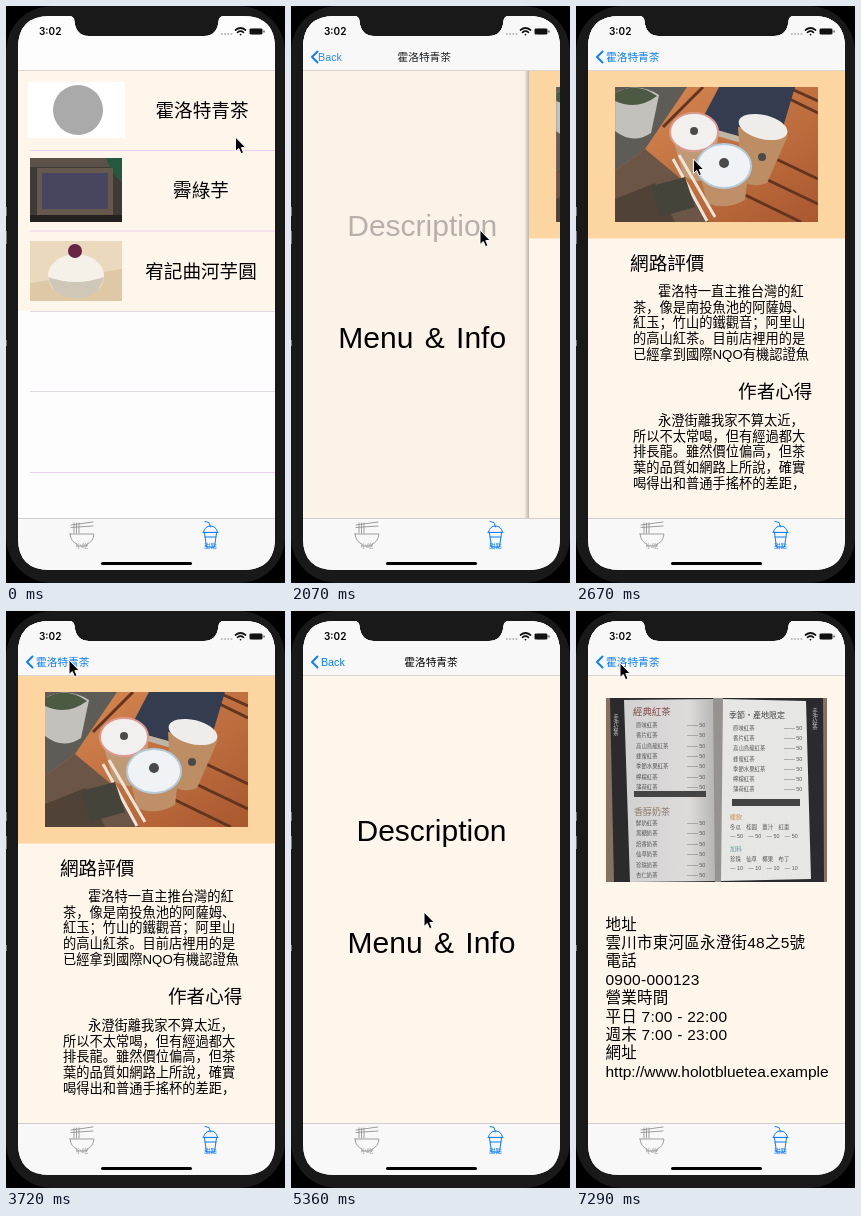
Recreate the animation shown at these times as an HTML page. Size 279x577 px, loop 8000 ms.

```html
<!DOCTYPE html>
<html lang="zh-Hans">
<head>
<meta charset="utf-8">
<style>
html, body { margin: 0; height: 100%; overflow: hidden; background: #000 }
svg { display: block }
text { font-family: 'Liberation Sans', 'Noto Sans CJK SC', 'Noto Sans CJK', sans-serif; white-space: pre }
.mid { text-anchor: middle }
.row, .head { font-size: 18.6px }
.big { font-size: 30px; word-spacing: 3px; text-anchor: middle }
.body { font-size: 13.25px }
.info { font-size: 15.5px }
.loose { letter-spacing: .25px }
.nav { font-size: 10.7px }
.blue { fill: #0a7cff }
.tiny { font-size: 5.4px; fill: #555 }
.side { font-size: 5.4px; fill: #ccc; writing-mode: vertical-rl }
.line { fill: none; stroke-linecap: round; stroke-linejoin: round }
</style>
</head>
<body>
<svg width="279" height="577" viewBox="0 0 279 577">
<defs>
  <clipPath id="screen"><path d="M44 10H63Q68 10 68.500 15Q70 30 83 30H198Q211 30 212.500 15Q213 10 218 10H237Q269 10 269 42V532Q269 564 237 564H44Q12 564 12 532V42Q12 10 44 10Z"/></clipPath>
  <linearGradient id="edge"><stop stop-opacity="0"/><stop offset="1" stop-opacity=".3"/></linearGradient>
  <linearGradient id="paper"><stop stop-color="#d2d1d1"/><stop offset=".7" stop-color="#dddcdb"/><stop offset="1" stop-color="#b3b1b0"/></linearGradient>
  <linearGradient id="wood" x2="1" y2="1"><stop stop-color="#d98a52"/><stop offset="1" stop-color="#a9582f"/></linearGradient>
</defs>
<rect width="279" height="577" rx="46" fill="#19191a"/>
<path d="M0 201v9M0 225v13M0 334v6" stroke="#777" stroke-width="2"/>

<g clip-path="url(#screen)">
  <rect x="12" y="10" width="257" height="554" fill="#fdfdfd"/>

  <g id="list">
    <rect x="12" y="65" width="257" height="448" fill="#fdfdfd"/>
    <rect x="12" y="65" width="257" height="240" fill="#fff6eb"/>
    <rect id="selected" x="12" y="65" width="257" height="80" fill="#d4d4d6"/>
    <path d="M24 144.500h245M24 225h245M24 466.500h245" stroke="#f0cdf3"/>
    <path d="M24 305.500h245M24 385.500h245" stroke="#e2dae3"/>
    <rect x="22" y="76" width="97" height="56" fill="#fff"/>
    <circle cx="72" cy="104" r="25" fill="#aaa"/>
    <svg x="24" y="152" width="92" height="64">
      <path d="M0 0H92V64H0Z" fill="#403a36"/>
      <path d="M0 0H92V9H0Z" fill="#5b5148"/>
      <path d="M76 0H92V24Q82 18 76 0Z" fill="#24583f"/>
      <path d="M7 10H83V57H7Z" fill="#65594e"/>
      <path d="M12 15H78V51H12Z" fill="#484560"/>
      <path d="M0 57H92V64H0Z" fill="#242020"/>
    </svg>
    <svg x="24" y="235" width="92" height="60">
      <path d="M0 0H92V60H0Z" fill="#ead9bd"/>
      <path d="M0 42L92 28V60H0Z" fill="#dfc8a5"/>
      <ellipse cx="46" cy="35" rx="28" ry="22" fill="#f5f1e8"/>
      <path d="M18 36Q46 46 74 36Q69 57 46 57T18 36Z" fill="#cfc7b7"/>
      <circle cx="45" cy="10" r="7" fill="#692344"/>
    </svg>
    <g class="mid">
      <text class="row" x="196" y="110.500">霍洛特青茶</text>
      <text class="row" x="195" y="191">霽綠芋</text>
      <text class="row" x="195" y="271.500">宥記曲河芋圓</text>
    </g>
    <rect id="listShade" x="12" y="65" width="257" height="448"/>
  </g>

  <g id="menu">
    <rect class="edge" x="7" y="65" width="5" height="448" fill="url(#edge)"/>
    <rect x="12" y="65" width="257" height="448" fill="#fff6eb"/>
    <text class="big" id="descBtn" x="140.500" y="230">Description</text>
    <text class="big" id="infoBtn" x="140.500" y="341.500">Menu &amp; Info</text>
    <rect id="menuShade" x="12" y="65" width="257" height="448"/>
  </g>

  <g id="detail">
    <rect class="edge" x="7" y="65" width="5" height="448" fill="url(#edge)"/>
    <rect x="12" y="65" width="257" height="448" fill="#fff6eb"/>
    <rect x="12" y="65" width="257" height="167.500" fill="#fdd5a0"/>
    <svg x="39" y="81" width="203" height="135">
      <path d="M0 0H203V135H0Z" fill="url(#wood)"/>
      <path d="M150 0L203 26M172 0L203 14M140 62L203 92M134 84L203 117M126 106L186 135M48 40L88 0" stroke="#63351f" stroke-width="3"/>
      <path d="M0 0H72L30 62L0 84Z" fill="#5d5c57"/>
      <path d="M0 6Q22 -6 44 8L36 46Q18 58 0 44Z" fill="#c3c1bb"/>
      <path d="M0 6Q22 -6 42 9Q22 24 0 14Z" fill="#4d5a43"/>
      <path d="M0 84L30 62L66 92L94 135H0Z" fill="#6b5546"/>
      <path d="M0 112L40 96L60 135H0Z" fill="#514238"/>
      <path d="M104 0H180L162 60L84 38Z" fill="#343c50"/>
      <path d="M84 38L162 60L160 66L82 43Z" fill="#bdb5a6"/>
      <path d="M58 52L68 88Q84 100 100 88L103 50Z" fill="#c09a74"/>
      <ellipse cx="79" cy="45" rx="24" ry="19" fill="#f1f0ef" stroke="#dc9a8e" stroke-width="2"/>
      <path d="M123 40L126 92Q136 102 152 96L173 48Z" fill="#bd8e63"/>
      <ellipse cx="148" cy="40" rx="25" ry="12" fill="#efedea" transform="rotate(14 148 40)"/>
      <path d="M84 84L92 116Q110 124 130 113L134 80Z" fill="#bf9067"/>
      <ellipse cx="109" cy="79" rx="27" ry="22" fill="#eff3f6" stroke="#b4cbdc" stroke-width="2"/>
      <path d="M58 72L92 134M64 68L100 130" stroke="#eee4d8" stroke-width="3"/>
      <path d="M36 99L70 90L80 120L45 130Z" fill="#45443a"/>
      <g fill="#4b4a4b"><circle cx="79" cy="44" r="4"/><circle cx="109" cy="76" r="5"/><circle cx="147" cy="70" r="4"/></g>
    </svg>
    <text class="head" x="54" y="264">網路評價</text>
    <text class="head" x="162" y="392">作者心得</text>
    <g id="reviews"></g>
  </g>

  <g id="info">
    <rect class="edge" x="7" y="65" width="5" height="448" fill="url(#edge)"/>
    <rect x="12" y="65" width="257" height="448" fill="#fff6eb"/>
    <svg x="30" y="87" width="221" height="184">
      <path d="M0 0H221V184H0Z" fill="#2b2a2c"/>
      <path d="M0 0H4L8 184H0ZM217 0H221V184H218Z" fill="#86705f"/>
      <path d="M18 2L108 1L111 183L24 184Z" fill="url(#paper)"/>
      <path d="M116 1L200 3L205 181L114 183Z" fill="#e6e6e5"/>
      <path d="M107 0H117L115 184H109Z" fill="#96928f"/>
      <g id="drinks"></g>
      <path d="M28 93H100V99H28ZM126 101H194V108H126Z" fill="#444"/>
    </svg>
    <g id="facts"></g>
  </g>

  <rect x="12" y="10" width="257" height="54" fill="#fdfdfd"/>
  <rect id="bar" x="12" y="10" width="257" height="54" fill="#f8f8f8"/>
  <path d="M12 64.500h257" stroke="#d9d6d3"/>
  <path id="chevron" class="line" d="M26.500 45.500L21 51L26.500 56.500" stroke="#0a7cff" stroke-width="1.900"/>
  <text id="title" class="nav mid" y="55" font-weight="500">霍洛特青茶</text>
  <text id="back" class="nav blue" y="55">Back</text>
  <text id="crumb" class="nav blue" y="55">霍洛特青茶</text>

  <text x="33" y="29" style="font:600 10px Inter,sans-serif">3:02</text>
  <path d="M215 28h12" stroke="#aaa" stroke-width="1.700" stroke-dasharray="1.700 1.500"/>
  <path class="line" d="M229.500 24Q234.500 20 239.500 24M231.500 26.300Q234.500 24 237.500 26.300M234.500 28.500v.1" stroke="#111" stroke-width="1.700"/>
  <rect x="243.500" y="22.500" width="13" height="6" rx="1.800" fill="none" stroke="#777"/>
  <path d="M244 23h12v5h-12zM257.500 24.500h1v2h-1z" fill="#111"/>

  <rect x="12" y="513" width="257" height="51" fill="#f8f8f8"/>
  <path d="M12 512.500h257" stroke="#cfcccb"/>
  <path class="line" d="M65 519L87 516M65 521.500L87 520M68 517V527M70.500 517V527M73 517V527M64 528H88Q87 536 81 538V540H71V538Q65 536 64 528Z" stroke="#929292" stroke-width=".9"/>
  <path class="line" d="M199 515.500L203 516.500L204.500 521M197.500 526Q199 520 204.500 520T211.500 526ZM197 526.500H212M198.500 527L200.500 541H208.500L210.500 527M199 531H210" stroke="#0a7cff"/>
  <text class="mid" x="76" y="541.500" font-size="6.200" fill="#929292">小吃</text>
  <text class="mid blue" x="204.500" y="541.500" font-size="6.200" font-weight="500">甜點</text>
  <rect x="95" y="556" width="91" height="3" rx="1.500"/>
</g>
<path id="cursor" d="M0 0V14.500L3.300 11.500L5.600 16.700L8 15.600L5.800 10.600H10.300Z" stroke="#fff" stroke-width="1"/>
</svg>

<script>
const $ = id => document.getElementById(id);
const line = (cls, x, y, str, extra = '') => `<text class="${cls}" x="${x}" y="${y}" ${extra}>${str}</text>`;
const column = (cls, x, y, pitch, rows) =>
  rows.map((str, i) => line(cls, x, y + i * pitch, str)).join('');

const review = (y, rows) => line('body', 82, y, rows[0]) + column('body', 57, y + 15.7, 15.7, rows.slice(1));
$('reviews').innerHTML =
  review(290, ['霍洛特一直主推台灣的紅', '茶，像是南投魚池的阿薩姆、', '紅玉；竹山的鐵觀音；阿里山',
    '的高山紅茶。目前店裡用的是', '已經拿到國際NQO有機認證魚']) +
  review(419, ['永澄街離我家不算太近，', '所以不太常喝，但有經過都大', '排長龍。雖然價位偏高，但茶',
    '葉的品質如網路上所說，確實', '喝得出和普通手搖杯的差距，']);

$('facts').innerHTML =
  column('info loose', 29.5, 318.5, 18.4, ['地址', '雲川市東河區永澄街48之5號', '電話', '0900-000123',
    '營業時間', '平日 7:00 - 22:00', '週末 7:00 - 23:00', '網址']) +
  line('info', 29.5, 466, 'http://www.holotbluetea.example');

const teas = ['原味紅茶', '香片紅茶', '高山烏龍紅茶', '蜂蜜紅茶', '季節水果紅茶', '檸檬紅茶', '薄荷紅茶'];
const milks = ['鮮奶紅茶', '黑糖奶茶', '焙香奶茶', '仙草奶茶', '珍珠奶茶', '杏仁奶茶'];
const heading = (x, y, size, color, str) =>
  line('', x, y, str, `font-size="${size}" font-weight="500" fill="${color}"`);
const priced = (x, y, pitch, rows) => column('tiny', x, y, pitch, rows) +
  column('tiny', x + 51, y, pitch, rows.map(() => '—— 50'));
$('drinks').innerHTML =
  heading(27, 17, 9.4, '#7d4a46', '經典紅茶') + priced(30, 29, 10.3, teas) +
  heading(28, 117, 9, '#8a7a68', '香醇奶茶') + priced(30, 127, 10.4, milks) +
  heading(123, 20, 8, '#444', '季節・產地限定') + priced(127, 32, 10.2, teas) +
  heading(124, 121, 6, '#c98e50', '暖飲') +
  column('tiny', 124, 131, 9, ['冬瓜　桂圓　薑汁　紅棗', '— 50　— 50　— 50　— 50']) +
  heading(124, 153, 6, '#5f9c9a', '加料') +
  column('tiny', 124, 163, 9, ['珍珠　仙草　椰果　布丁', '— 10　— 10　— 10　— 10']) +
  line('side', 10, 16, '手沖好茶') + line('side', 209, 10, '手沖好茶');

const LOOP = 8000, STEP = 148.75, WIDTH = 257, PARALLAX = 77;
const TAP = { row: 890, desc: 2050, back: 4611, info: 5770 };

// Cursor waypoints: time, x, y
const path = [[0, 229.5, 131], [298, 226, 146], [595, 230, 122], [1190, 230, 122], [1785, 189, 224],
  [2231, 189, 224], [2677, 117.5, 153], [2975, 65, 83], [3421, 63, 49], [4760, 63, 49],
  [5355, 133, 301], [5653, 140, 334], [6099, 140, 334], [6843, 50, 79], [7288, 44, 52], [LOOP, 44, 52]];

function cursorAt(t) {
  const i = path.findIndex(k => k[0] > t);
  const [t0, x0, y0] = path[i - 1], [t1, x1, y1] = path[i];
  const f = (t - t0) / (t1 - t0);
  return [x0 + (x1 - x0) * f, y0 + (y1 - y0) * f];
}

// Critically damped spring from 0 to 1
function spring(t, start) {
  const k = Math.max(0, t - start) * 0.0183;
  return 1 - (1 + k) * Math.exp(-k);
}

const move = (id, x, y = 0) => $(id).setAttribute('transform', `translate(${x} ${y})`);
const fade = (id, opacity) => $(id).setAttribute('opacity', opacity);
const label = (id, x, opacity) => { $(id).setAttribute('x', x); fade(id, opacity); };

function page(id, shown, covered = 0) {
  move(id, WIDTH * (1 - shown) - PARALLAX * covered);
  $(id).setAttribute('visibility', shown > 0.001 ? 'visible' : 'hidden');
  $(id).querySelector('.edge').setAttribute('opacity', 1 - shown);
}

// A tapped button turns pale, then recovers as the next page covers it
const tapped = (t, start, p) => t > start && t < start + 600 ? 0.27 + 0.73 * Math.max(0, p * 2 - 1) : 1;

function draw(now) {
  // The screen refreshes in coarse steps
  const t = Math.floor((now % LOOP + 20) / STEP) * STEP;
  const menu = spring(t, TAP.row);
  const detail = spring(t, TAP.desc) - spring(t, TAP.back);
  const info = spring(t, TAP.info);
  const deep = Math.max(detail, info);
  const pressed = t >= TAP.back && t < TAP.back + 140 ? 0.22 : 1;

  move('list', -PARALLAX * menu);
  page('menu', menu, deep);
  page('detail', detail);
  page('info', info);
  fade('selected', t > TAP.row ? 1 : 0);
  fade('listShade', 0.1 * menu);
  fade('menuShade', 0.1 * deep);
  fade('descBtn', tapped(t, TAP.desc, detail));
  fade('infoBtn', tapped(t, TAP.info, info));

  fade('bar', menu);
  fade('chevron', menu * pressed);
  label('title', 140 + 167 * (1 - menu) - 56 * deep, menu * (1 - deep));
  label('back', 30 + 33 * (1 - menu) - 24 * deep, menu * (1 - deep));
  label('crumb', 30 + 83 * (1 - deep), deep * deep * pressed);

  move('cursor', ...cursorAt(t));
  requestAnimationFrame(draw);
}
requestAnimationFrame(draw);
</script>
</body>
</html>
```
